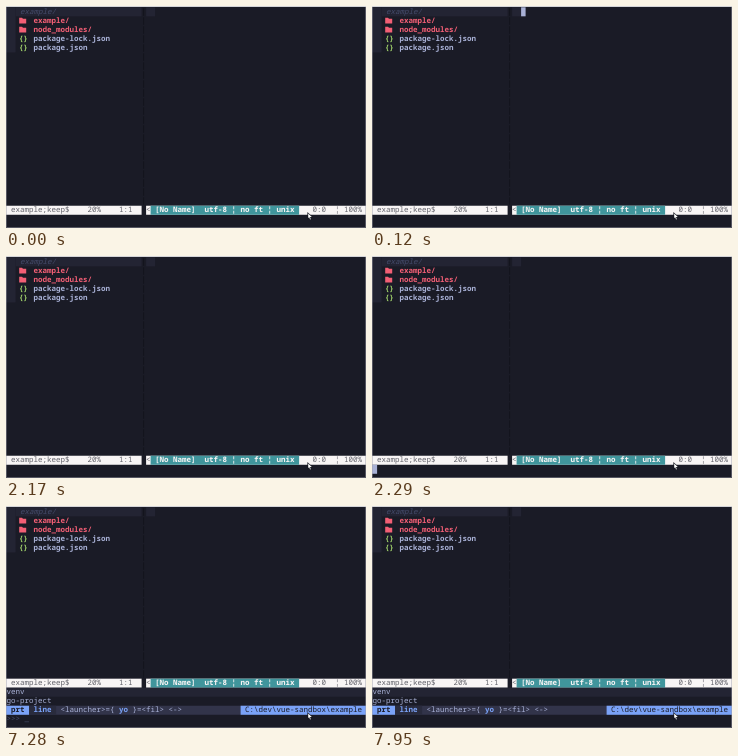
Recreate the animation shown at these times as an HTML page with a canvas. Size 360 by 222 pixels, loop 8 s.

```html
<!DOCTYPE html>
<html lang="en">
<head>
<meta charset="utf-8">
<title>Editor launcher</title>
<style>
  html, body { margin: 0; height: 100%; overflow: hidden; background: #1a1b26; }
  canvas { display: block; width: 360px; height: 222px; }
</style>
</head>
<body>
<canvas width="360" height="222"></canvas>
<script>
const canvas = document.querySelector('canvas');
const ctx = canvas.getContext('2d');
const LOOP = 8000, CELL = 4.5, ROW = 9.02;
const color = {
  bg: '#1a1b26', line: '#232433', bar: '#32344a', mode: '#292b3d',
  text: '#a9b1d6', dim: '#444b6a', blue: '#7aa2f7', red: '#f25f75',
  green: '#9ece6a', teal: '#40959c', white: '#f8f5f5', ink: '#62626a',
  split: '#0e0f16', edge: 'rgba(160, 160, 170, 0.45)'
};
const colX = col => col && 0.6 + col * CELL;
const rowY = row => 1.3 + row * ROW;

function fill(c, x, y, w, h) {
  ctx.fillStyle = c;
  ctx.fillRect(x, y, w, h);
}

function shape(c, ...points) {
  ctx.fillStyle = c;
  ctx.beginPath();
  for (const [x, y] of points) ctx.lineTo(x, y);
  ctx.fill();
}

function cells(row, from, to, c) {
  fill(c, colX(from), rowY(row), colX(to) - colX(from), ROW);
}

function write(row, col, text, c = color.text, style = '') {
  ctx.font = `${style} 7.5px "Noto Sans Mono", "Noto Sans CJK JP", monospace`;
  ctx.letterSpacing = /[ァ-ヶ]/.test(text) ? '1.5px' : '0px';
  ctx.fillStyle = c;
  ctx.fillText(text, 0.5 + col * CELL, rowY(row) + 6.5);
}

function folder(row) {
  const y = rowY(row);
  shape(color.red, [13.2, y + 1.4], [16, y + 1.4], [17, y + 2.4], [20.2, y + 2.4], [20.2, y + 7.2], [13.2, y + 7.2]);
}

function memo(row) {
  const y = rowY(row);
  fill('#e4e4e4', 1.5, y + 1, 6, 7.5);
  for (let i = 0; i < 3; i++) fill('#8a909c', 2.5, y + 2.5 + i * 1.8, 3.5, 0.6);
  shape('#e8b341', [8, y + 1.5], [9.2, y + 2.7], [5.2, y + 7], [4.5, y + 6]);
}

function hammer(row) {
  const y = rowY(row);
  shape('#c07a3c', [3.5, y + 3], [4.6, y + 2.2], [9, y + 7.2], [7.8, y + 8.3]);
  shape('#b9bec6', [1, y + 4], [4.5, y + 0.8], [6, y + 2.2], [2.6, y + 5.5]);
}

function sidebar() {
  fill(color.line, 0, rowY(0), colX(2), 5 * ROW);
  cells(0, 2, 30, color.line);
  cells(0, 31, 33, color.line);
  write(0, 3, 'example/', color.dim, 'italic');
  ['example/', 'node_modules/'].forEach((name, i) => {
    folder(i + 1);
    write(i + 1, 6, name, color.red, 'bold');
  });
  ['package-lock.json', 'package.json'].forEach((name, i) => {
    write(i + 3, 2.75, '{}', color.green, 'bold');
    write(i + 3, 6, name, color.text, '600');
  });
}

function statusLine(row) {
  for (let r = 0; r < row; r++) write(r, 30, '|', color.split);
  cells(row, 0, 30, color.white);
  cells(row, 31, 80, color.white);
  cells(row, 32, 65, color.teal);
  write(row, 1, 'example;keep$', color.ink);
  write(row, 18, '20%', color.ink);
  write(row, 25, '1:1', color.ink);
  write(row, 31, '<', color.ink);
  write(row, 33, '[No Name]', color.white, 'bold');
  write(row, 44, 'utf-8 ¦ no ft ¦ unix', color.white, 'bold');
  write(row, 68, '0:0', color.ink);
  write(row, 73, '¦ 100%', color.ink);
}

function launcher(mode, before, current, prompt) {
  cells(22, 0, 80, color.bar);
  cells(22, 0, 5, color.blue);
  cells(22, 5, 11, color.mode);
  cells(22, 52, 80, color.blue);
  write(22, 1, 'prt', color.bg, 'bold');
  write(22, 6, mode, color.blue, 'bold');
  write(22, 12, `<${before}>={`);
  const col = 12 + before.length + 5;
  write(22, col, current, color.blue, 'bold');
  write(22, col + current.length + 1, '}=<fil> <->');
  write(22, 53, 'C:\\dev\\vue-sandbox\\example', color.bg);
  if (prompt) write(23, 0, '>>> _', color.dim);
}

function editMenu() {
  statusLine(17);
  cells(21, 0, 80, color.line);
  write(18, 0, '--edit-menu--');
  memo(19);
  write(19, 3, 'ワークスペースシンボル');
  memo(20);
  write(20, 3, 'ドキュメントシンボル');
  hammer(21);
  write(21, 3, 'Yeoman');
  launcher('path', 'mru', 'launcher', true);
}

function projectMenu(selected, prompt) {
  statusLine(19);
  cells(selected, 0, 80, color.line);
  write(20, 0, 'venv');
  write(21, 0, 'go-project');
  launcher('line', 'launcher', 'yo', prompt);
}

function pointer() {
  shape('#15161e', [301.4, 206], [307, 211.2], [304.8, 211.5], [305.6, 213.6], [304, 214], [303.2, 212], [301.4, 213.2]);
  shape('#fff', [302.2, 207.6], [305.8, 211], [304, 211], [304.8, 213.2], [304, 213.4], [303.3, 211.2], [302.2, 212]);
}

function windowEdge() {
  fill('#d4d4d8', 0, 0, 360, 1);
  fill(color.edge, 0, 1, 1, 221);
  fill(color.edge, 359, 1, 1, 221);
  fill(color.edge, 1, 221, 358, 1);
}

function draw(t) {
  fill(color.bg, 0, 0, 360, 222);
  sidebar();
  if (t >= 1140 && t < 2170) {
    editMenu();
  } else if (t >= 6520) {
    projectMenu(t < 7280 ? 21 : 20, t < 7950);
  } else {
    statusLine(22);
    if (t >= 120 && t < 1140) cells(0, 33, 34, color.text);
    if (t >= 2290) cells(23, 0, 1, color.text);
  }
  windowEdge();
  pointer();
}

ctx.textRendering = 'geometricPrecision';
const start = performance.now();
function tick() {
  draw((performance.now() - start) % LOOP);
  requestAnimationFrame(tick);
}
tick();
</script>
</body>
</html>
```
